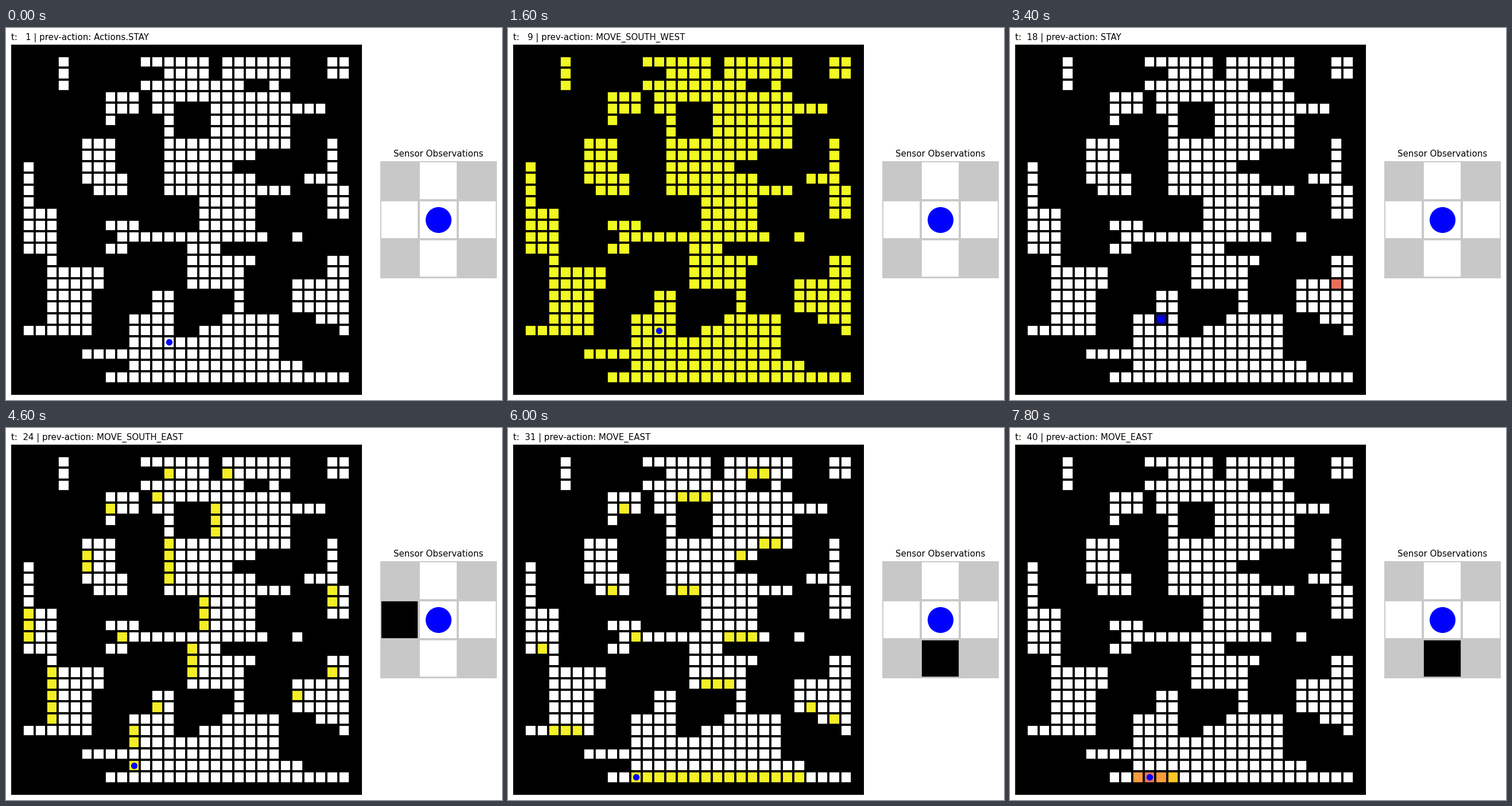
Recreate the animation shown at these times as a matplotlib script. Size 864 by 648 pixels, loop 8 s.

```python
import matplotlib.pyplot as plt
import numpy as np
from matplotlib.animation import FuncAnimation
from matplotlib.collections import PatchCollection
from matplotlib.patches import Rectangle

W, H, DPI = 864, 648, 90
STEPS, STEP_MS = 40, 200

# Grid world: "o" is free, "." is wall; an outer wall is added around it.
LEVEL = """
...o......oooooo.oooooo...oo
...o........oooo.oooooo...oo
...o......ooooooooo..o......
.......ooo.oooooooooooo.....
.......ooo.oo...oooooooooo..
.......o....o...ooooooo.....
............o...ooooooo.....
.....ooo....ooooooooooo...o.
.....ooo....oooooooo......o.
o....ooo....oooooo........o.
o....oooo...oooooooo....ooo.
o.....ooo...ooooooooooo...oo
o..............ooooo......oo
ooo............ooooo......oo
ooo....ooo.....ooooo........
ooo.....ooooooooooooo..o....
ooo....oo.....ooo...........
..o...........oooooo......oo
..ooooo.......ooooo.......oo
..ooooo.......ooooo....ooooo
..oooo.....oo.....o....ooooo
..oooo.....oo.....o....ooooo
..oooo...oooo....ooooo...ooo
oooooo...oooo..ooooooo.....o
.........ooooooooooooo......
.....ooooooooooooooooo......
.........ooooooooooooooo....
.......ooooooooooooooooooooo
""".split()

MOVES = ("X W SE NW N W NE E SW W NE S N N N SE W S SW SW S S S N S E N SW N S "
         "X N N W E S X E S X").split()
COMMANDS = {12: "SW", 18: "X", 24: "SE", 31: "E", 40: "E"}
RESETS = {9, 23, 30}
NAMES = {"N": "NORTH", "S": "SOUTH", "E": "EAST", "W": "WEST"}
SIDES = [(-1, 0), (0, 1), (1, 0), (0, -1)]

free = np.pad(np.array([[ch == "o" for ch in row] for row in LEVEL]), 1)
N = len(free)


def shift(a, dr, dc):
    """Value of the neighbour at (dr, dc) for every cell."""
    return np.roll(a, (-dr, -dc), axis=(0, 1))


open_sides = np.stack([shift(free, *d) for d in SIDES], axis=-1)


def walk(start):
    r, c = start
    path = []
    for m in MOVES:
        r += ("S" in m) - ("N" in m)
        c += ("E" in m) - ("W" in m)
        path.append((r, c))
    return path


def spread(b):
    return sum(shift(b, dr, dc) for dr in (-1, 0, 1) for dc in (-1, 0, 1))


def run_filter(path):
    b = np.zeros((N, N))
    beliefs = [b]
    for t, pos in enumerate(path[1:], start=2):
        match = free & (open_sides == open_sides[pos]).all(axis=-1)
        if t in RESETS:
            b = free.astype(float)
        else:
            b = match * (1.0 if t == 2 else spread(b))
            if not b.any():
                b = match.astype(float)
        b = b / b.sum()
        beliefs.append(b)
    return beliefs


def shade(b, t):
    if t < min(RESETS):
        return b / max(b.max(), 1e-9) * np.clip((t - 2) / 5, 0, 1)
    return np.interp(b, [0, 0.38, 0.46, 0.54], [0, 0.36, 0.37, 1])


def caption(t):
    move = COMMANDS.get(t, MOVES[t - 1])
    if t == 1:
        action = "Actions.STAY"
    elif move == "X":
        action = "STAY"
    else:
        action = "MOVE_" + "_".join(NAMES[k] for k in move)
    return f"t: {t:3d} | prev-action: {action}"


path = walk((25, 13))
beliefs = run_filter(path)
cmap = plt.get_cmap("plasma_r")

fig = plt.figure(figsize=(W / DPI, H / DPI), dpi=DPI, facecolor="white")
ax = fig.add_axes([0, 0, 1, 1])
ax.set(xlim=(0, W), ylim=(H, 0))
ax.axis("off")

GRID_LW = 3
TITLE_PAD = 7.5
FONT = dict(fontsize=12, family="DejaVu Sans", va="baseline")


def square(x, y, size, **kw):
    return Rectangle((x - size / 2, y - size / 2), size, size, **kw)


def dot(x, y, size):
    return ax.plot([x], [y], "o", color="blue", ms=size, zorder=3)[0]


# Map panel
SIZE = 610.5
X0, Y0 = 9, 639 - SIZE
CELL = SIZE / N


def centre(r, c):
    return X0 + (c + 0.5) * CELL, Y0 + (r + 0.5) * CELL


ax.add_patch(Rectangle((X0, Y0), SIZE, SIZE, fc="black", lw=0))
tiles = PatchCollection([square(*centre(r, c), CELL)
                         for r, c in np.argwhere(free)],
                        edgecolors="black", linewidths=GRID_LW, zorder=2)
ax.add_collection(tiles)
robot = dot(0, 0, 8)
title = ax.text(X0, Y0 - TITLE_PAD, "", **FONT)

# Sensor panel, a third of the map's size and level with its middle
SPAN = SIZE / 3
SX, SY = 855 - SPAN / 2, Y0 + SIZE / 2
PITCH = SPAN / 3
GREY = "#c8c8c8"
panel = ax.add_patch(square(SX, SY, SPAN, fc=GREY, lw=0))


def sensor_cell(dr, dc):
    cell = ax.add_patch(square(SX + dc * PITCH, SY + dr * PITCH, PITCH,
                               fc="white", ec=GREY, lw=GRID_LW))
    cell.set_clip_path(panel)
    return cell


sensor_cell(0, 0)
sensors = [sensor_cell(*d) for d in SIDES]
dot(SX, SY, 35)
ax.text(SX, SY - SPAN / 2 - TITLE_PAD, "Sensor Observations", ha="center",
        **FONT)


def update(i):
    t = i + 1
    b = beliefs[i][free]
    colors = cmap(shade(b, t))
    colors[b < 5e-5] = 1
    tiles.set_facecolor(colors)
    x, y = centre(*path[i])
    robot.set_data([x], [y])
    for patch, is_open in zip(sensors, open_sides[path[i]]):
        patch.set_facecolor("white" if is_open else "black")
    title.set_text(caption(t))
    return [tiles, robot, title, *sensors]


anim = FuncAnimation(fig, update, frames=STEPS, interval=STEP_MS,
                     repeat=True, repeat_delay=0, blit=False)
plt.show()
```
